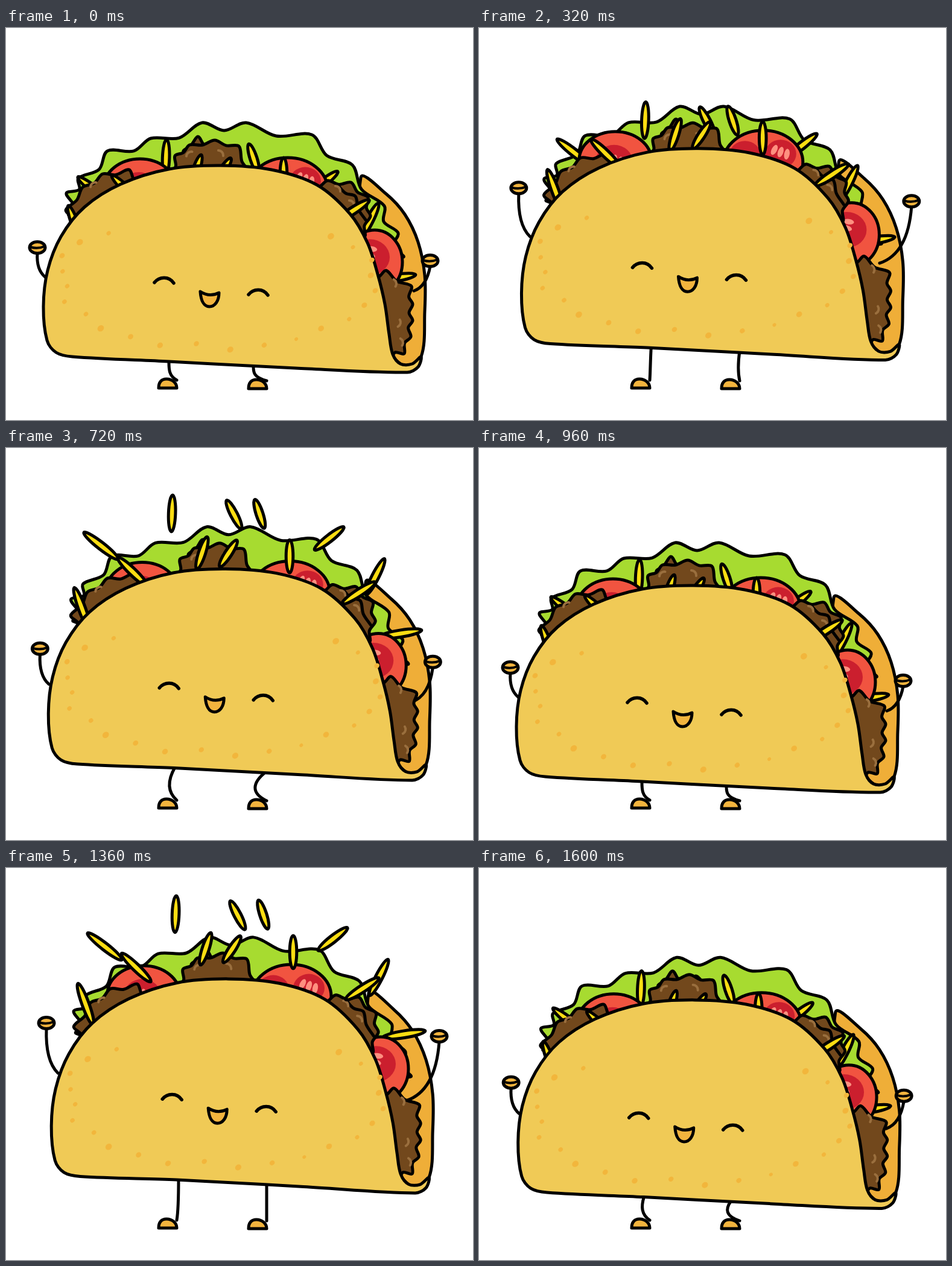
Animation of 774 by 650 pixels, one loop 1680 ms. Source, as an HTML page with a canvas:

```html
<!DOCTYPE html>
<html lang="en">
<head>
<meta charset="utf-8">
<title>Dancing taco</title>
<style>
  html, body { margin: 0; width: 100%; height: 100%; overflow: hidden; background: #fff; }
  canvas { display: block; }
</style>
</head>
<body>
<canvas id="stage" width="774" height="650"></canvas>
<script>
const ctx = document.getElementById('stage').getContext('2d');
const STEP = 80, STEPS = 21, LINE = 5;

const INK = '#000', SHELL = '#f0ca56', BACK = '#efae38', SPOT = '#f2b63c', LEAF = '#a7db30',
  RED = '#f15440', DEEP = '#cb1f2e', SEED = '#ff9080', MEAT = '#72481c', SHINE = '#9a6f3e',
  CHEESE = '#fcdd12', LIMB = '#f2b43e';

const pts = s => s.split(' ').map(p => p.split(',').map(Number));
const clamp = v => Math.max(0, Math.min(1, v));

// Key points of the crouching pose.
const body = pts('110,545 83,538 68,518 62,462 69,402 91,346 130,297 190,259 270,234 355,228 440,235 515,260 ' +
  '570,308 599,356 616,408 628,458 635,508 641,541 654,557 673,557 688,545 683,562 665,571 480,564 270,553');
const back = pts('588,248 630,275 661,309 683,355 694,410 694,470 688,545 660,562 600,480');
const leaf = ruffle('104,310 100,274 120,249 168,204 240,183 325,157 398,157 507,177 574,227 627,295 650,340 658,380', 13, [360, 400]);
const meats = [
  ruffle('294,205 318,180 340,205', 2, [318, 215]),
  ruffle('277,240 280,212 304,194 346,186 386,196 401,240', 4, [340, 280]),
  ruffle('114,328 99,302 127,264 160,242 204,235 226,262', 5, [180, 310]),
  ruffle('500,266 533,253 572,256 600,281 604,312 594,345', 5, [540, 320]),
  ruffle('608,412 630,402 672,428 674,458 674,485 671,512 660,540 638,545', 6, [600, 480])
];
const crease = ruffle('551,262 579,279 596,318', 4, [540, 320]).slice(0, -1);
const glints = pts('307,213,0 352,211,1.5 148,264,0 546,270,1.5 569,294,1.5 639,424,2 646,488,2.5 650,522,2');

// Cheese shreds: tip and lean in degrees.
const highCheese = pts('266,190,2 404,197,-18 358,198,-27 546,241,52 615,295,27 674,410,81 123,250,-52');
const lowCheese = pts('322,215,18 370,220,33 460,220,0 598,288,57 179,248,-46 105,299,-20');

// Scalloped outline through the peaks, closed through the core.
function ruffle(peaks, depth, core) {
  const out = [];
  pts(peaks).forEach((p, i, all) => {
    out.push(p);
    const q = all[i + 1];
    if (!q) return;
    const x = (p[0] + q[0]) / 2, y = (p[1] + q[1]) / 2;
    const pull = depth / Math.hypot(core[0] - x, core[1] - y);
    out.push([x + (core[0] - x) * pull, y + (core[1] - y) * pull]);
  });
  return [...out, core];
}

// Rises from beat 1 to its top at beat 6, then drops within the given span.
function hop(beat, rise, fall, span = 3.4) {
  return beat < 6
    ? 1 - (1 - clamp((beat - 1) / 5)) ** rise
    : 1 - clamp((beat - 6) / span) ** fall;
}

// Lifts a point; the middle and the top travel further than the lower corners.
const warp = lift => ([x, y]) => {
  const k = 1 + 0.12 * (400 - y) / 200 - 0.1 * ((x - 370) / 300) ** 2;
  return [x + 0.33 * lift, y - lift * k];
};

function spline(points, closed) {
  const n = points.length;
  const at = i => points[closed ? (i + n) % n : Math.max(0, Math.min(n - 1, i))];
  const gap = (a, b) => Math.hypot(b[0] - a[0], b[1] - a[1]);
  const handle = (i, reach) => {
    const a = at(i - 1), b = at(i), c = at(i + 1), k = reach / 3 / (gap(a, b) + gap(b, c));
    return [b[0] + (c[0] - a[0]) * k, b[1] + (c[1] - a[1]) * k];
  };
  ctx.beginPath();
  ctx.moveTo(...points[0]);
  for (let i = 0; i < (closed ? n : n - 1); i++) {
    const len = gap(at(i), at(i + 1));
    ctx.bezierCurveTo(...handle(i, len), ...handle(i + 1, -len), ...at(i + 1));
  }
  if (closed) ctx.closePath();
}

function stroke(color = INK, width = LINE) {
  ctx.strokeStyle = color;
  ctx.lineWidth = width;
  ctx.stroke();
}

function fill(color) {
  ctx.fillStyle = color;
  ctx.fill();
}

function blob(points, color) {
  spline(points, true);
  fill(color);
  stroke();
}

function oval(x, y, rx, ry, turn, color) {
  ctx.beginPath();
  ctx.ellipse(x, y, rx, ry, turn, 0, 7);
  fill(color);
}

function shifted(dx, dy, draw) {
  ctx.save();
  ctx.translate(dx, dy);
  draw();
  ctx.restore();
}

function shreds(list, dx, dy) {
  shifted(dx, dy, () => {
    for (const [x, y, lean] of list) {
      const half = 20 + 0.04 * Math.abs(x - 400), a = (90 + lean) * Math.PI / 180;
      oval(x + half * Math.cos(a), y + half * Math.sin(a), half + 5, 5.8, a, CHEESE);
      stroke();
    }
  });
}

// A slice with dark pulp at the given offsets and three seeds in the last one.
function slice(x, y, rx, ry, pulp, size, turn) {
  shifted(x, y, () => {
    oval(0, 0, rx, ry, 0, RED);
    for (const [px, py] of pulp) oval(px, py, size, size * 0.9, 0, DEEP);
    const [sx, sy] = pulp[pulp.length - 1];
    for (let i = -1; i < 2; i++) {
      const a = turn + i * 0.15;
      oval(sx - i * 11 * Math.sin(turn), sy - 3 + i * 11 * Math.cos(turn), 9, 4.5, a, SEED);
    }
    ctx.beginPath();
    ctx.ellipse(0, 0, rx, ry, 0, 0, 7);
    stroke();
  });
}

function glint(x, y, turn) {
  ctx.beginPath();
  ctx.arc(x, y, 8, 3.2 + turn, 4.9 + turn);
  stroke(SHINE, 4);
}

function arm(hx, hy, sx, sy, cx, bend) {
  ctx.beginPath();
  ctx.moveTo(hx, hy + 9);
  ctx.quadraticCurveTo(cx, hy + (sy - hy) * bend, sx, sy);
  stroke();
  oval(hx, hy, 13, 9.5, 0, LIMB);
  stroke();
  ctx.beginPath();
  ctx.moveTo(hx - 12, hy - 1);
  ctx.quadraticCurveTo(hx, hy + 3, hx + 12, hy - 2);
  stroke(INK, 4);
}

function leg(hx, hy, bow, fx, fy) {
  const cx = hx - bow, h = fy - hy;
  ctx.beginPath();
  ctx.moveTo(hx, hy);
  ctx.bezierCurveTo(cx, hy + h * 0.4, cx, hy + h * 0.75, fx, fy);
  stroke();
  shifted(fx - 15, fy + 13, () => {
    ctx.beginPath();
    ctx.moveTo(-15, 0);
    ctx.bezierCurveTo(-15, -10, -10, -15, -2, -15);
    ctx.bezierCurveTo(7, -15, 15, -9, 15, 0);
    ctx.closePath();
    fill(LIMB);
    stroke();
  });
}

function eye(x, y) {
  ctx.beginPath();
  ctx.moveTo(x - 16, y + 8);
  ctx.bezierCurveTo(x - 8, y - 2, x + 8, y - 3, x + 16, y + 9);
  stroke(INK, 5.5);
}

function face(move) {
  const [x, y] = move([337, 448]);
  shifted(x, y, () => {
    eye(-75, -34);
    eye(81, -14);
    ctx.beginPath();
    ctx.moveTo(-15, -11);
    ctx.quadraticCurveTo(0, -1, 16, -9);
    ctx.bezierCurveTo(16, 5, 9, 14, 0, 14);
    ctx.bezierCurveTo(-9, 14, -14, 4, -15, -11);
    ctx.closePath();
    fill(LIMB);
    stroke();
  });
}

// Toasted spots follow the rim, leaving the top clear.
function spots(move) {
  let seed = 7;
  const rand = () => (seed = seed * 16807 % 2147483647) / 2147483647;
  for (let i = 0; i < 22; i++) {
    const a = -0.7 + 4.6 * i / 21, r = 0.94 + 0.1 * rand(), size = 3 + 3 * rand();
    oval(...move([350 + 262 * r * Math.cos(a), 415 + 115 * r * Math.sin(a)]), size, size * 0.85, -0.7, SPOT);
  }
}

function draw(beat) {
  const lift = 40 * hop(beat, 2, 1.85), sway = 0.4 * lift;
  const reach = hop(beat, 5, 0.65);
  const tomatoes = 55 * hop(beat, 3.4, 1.3);
  const stretch = clamp(lift / 25), slack = stretch - reach;
  const move = warp(lift);
  const hx = 52 + 15 * reach, hy = 364 - 107 * reach;
  ctx.clearRect(0, 0, 774, 650);

  leg(270 + 8 * (stretch + reach), 554 - lift, 18 * slack, 283, 584);
  leg(410 + 22 * stretch, 561 - lift, 36 * slack, 432, 585);
  arm(hx, hy, 65 + 21 * reach, 413 - 73 * reach, hx - 2, 0.75);

  blob(back.map(move), BACK);
  arm(hx + 651, hy + 22, 676 - 13 * reach, 436 - 50 * reach, hx + 645, 0.85);
  blob(leaf.map(warp(0.92 * lift)), LEAF);
  shreds(highCheese, sway, -139 * hop(beat, 1.17, 3.35, 3.1));

  shifted(0.15 * lift, -tomatoes, () => {
    slice(222, 265, 60, 48, [[-2, 2]], 31, 1.9);
    slice(467, 268, 66, 53, [[-30, -12], [29, -14]], 26, 1.9);
  });
  shifted(0.25 * lift, -tomatoes, () => slice(611, 388, 46, 53, [[-8, -8]], 33, 0.3));

  for (const meat of meats) blob(meat.map(move), MEAT);
  spline(crease.map(move));
  stroke();
  for (const [x, y, turn] of glints) glint(...move([x, y]), turn);
  shreds(lowCheese, sway, -103 * hop(beat, 1.7, 2.15, 3.1));

  blob(body.map(move), SHELL);
  spots(move);
  face(move);
}

// Ten beats per bounce; the first bounce lingers one extra step in the crouch.
function beatAt(step) {
  if (step > 10) return step - 11;
  return step < 2 ? step / 2 : step - 1;
}

ctx.lineCap = ctx.lineJoin = 'round';

function tick() {
  draw(beatAt(Math.floor(performance.now() / STEP) % STEPS));
  requestAnimationFrame(tick);
}
tick();
</script>
</body>
</html>
```
